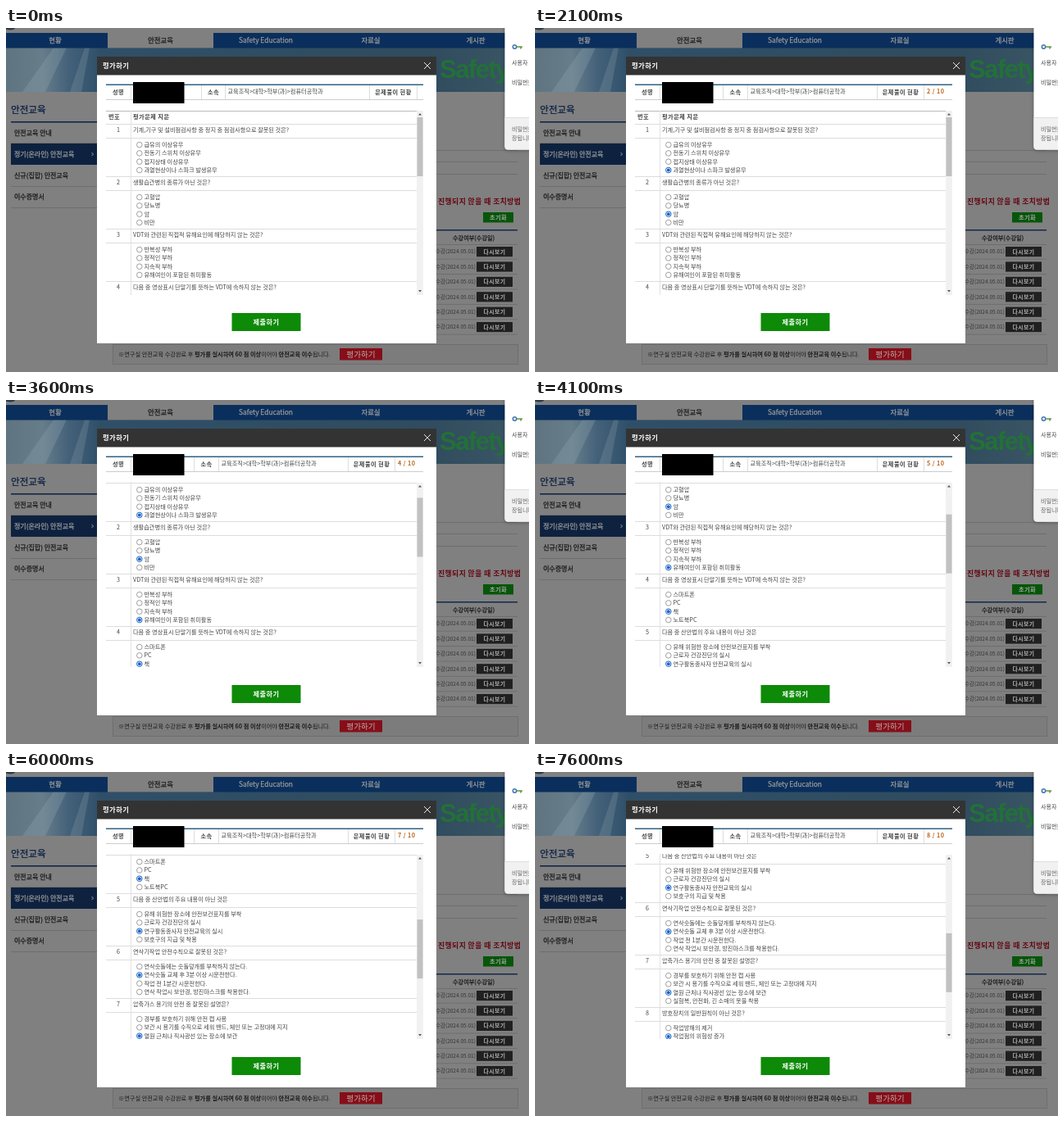
An HTML page for the animation above (8000 ms loop, 638 by 420 pixels).

```html
<!DOCTYPE html>
<html>
<head>
<meta charset="utf-8">
<style>
html, body { margin: 0; width: 100%; height: 100%; overflow: hidden; background: #808080; }
svg { display: block; width: 638px; height: 420px; }
text { font: 7.2px "Noto Sans CJK KR", "Noto Sans CJK", "Noto Sans CJK JP", sans-serif; fill: #444; white-space: pre; }
.b { font-weight: 700; letter-spacing: .45px; }
.banner { font: 700 31px "Liberation Sans", sans-serif; letter-spacing: -1.5px; fill: #237038; }
</style>
</head>
<body>
<svg id="stage" viewBox="0 0 638 420">
  <defs>
    <clipPath id="view"><rect x="122" y="100" width="379" height="226"/></clipPath>
    <linearGradient id="sky">
      <stop offset="0" stop-color="#5f7480"/><stop offset=".07" stop-color="#667d8a"/>
      <stop offset=".12" stop-color="#44617a"/><stop offset=".18" stop-color="#2f4f68"/>
      <stop offset=".82" stop-color="#304c5e"/><stop offset="1" stop-color="#3c5866"/>
    </linearGradient>
    <filter id="soft" x="-30%" y="-10%" width="160%" height="130%">
      <feDropShadow dx="0" dy="1" stdDeviation="2" flood-opacity=".35"/>
    </filter>
  </defs>
  <g id="page"></g>
  <g id="dialog"></g>
  <g id="fields"></g>
  <g clip-path="url(#view)"><g id="list"></g></g>
  <g id="bar"></g>
  <g id="popup"></g>
</svg>
<script>
const $ = id => document.getElementById(id);
const rect = (x, y, w, h, fill, more = '') =>
  `<rect x="${x}" y="${y}" width="${w}" height="${h}" fill="${fill}" ${more}/>`;
const path = (d, stroke, width = 1, fill = 'none') =>
  `<path d="${d}" stroke="${stroke}" stroke-width="${width}" fill="${fill}"/>`;
// y is the middle of the line of text; heavy thickens the strokes a little
const text = (x, y, str, { size = 7.2, fill = '#444', bold = 0, mid = 0, heavy = 0 } = {}) =>
  `<text x="${x}" y="${y + size * .36}" ${bold ? 'class="b"' : ''} ${mid ? 'text-anchor="middle"' : ''}
    ${heavy ? `stroke="${fill}" stroke-width=".25"` : ''} style="font-size:${size}px;fill:${fill}">${str}</text>`;
const button = (x, y, w, h, fill, label, size, color = '#fff') =>
  rect(x, y, w, h, fill) + text(x + w / 2, y + h / 2, label, { size, fill: color, bold: 1, mid: 1 });

const QUESTIONS = [
  ['기계,기구 및 설비점검사항 중 정지 중 점검사항으로 잘못된 것은?', 3,
    '급유의 이상유무', '전동기 스위치 이상유무', '접지상태 이상유무', '과열현상이나 스파크 발생유무'],
  ['생활습관병의 종류가 아닌 것은?', 2, '고혈압', '당뇨병', '암', '비만'],
  ['VDT와 관련된 직접적 유해요인에 해당하지 않는 것은?', 3,
    '반복성 부하', '정적인 부하', '지속적 부하', '유해여인이 포함된 취미활동'],
  ['다음 중 영상표시 단말기를 뜻하는 VDT에 속하지 않는 것은?', 2, '스마트폰', 'PC', '책', '노트북PC'],
  ['다음 중 산안법의 주요 내용이 아닌 것은', 2, '유해 위험한 장소에 안전보건표지를 부착',
    '근로자 건강진단의 실시', '연구활동종사자 안전교육의 실시', '보호구의 지급 및 착용'],
  ['연삭기작업 안전수칙으로 잘못된 것은?', 1, '연삭숫돌에는 숫돌덮개를 부착하지 않는다.',
    '연삭숫돌 교체 후 3분 이상 시운전한다.', '작업 전 1분간 시운전한다.', '연삭 작업시 보안경, 방진마스크를 착용한다.'],
  ['압축가스 용기의 안전 중 잘못된 설명은?', 2, '경부를 보호하기 위해 안전 캡 사용',
    '보관 시 용기를 수직으로 세워 밴드, 체인 또는 고정대에 지지', '열원 근처나 직사광선 있는 장소에 보관',
    '실험복, 안전화, 긴 소매의 옷을 착용'],
  ['방호장치의 일반원칙이 아닌 것은?', 1, '작업방해의 제거', '작업점의 위험성 증가']
];
const CLICKS = [500, 1500, 2400, 3200, 4100, 5000, 5900, 7200];
const LOOP = 8000, ROW = 64;
const optionY = (q, i) => 142.4 + q * ROW + i * 10.3;
// each answer is scrolled just into view before it is picked
const scrollFor = n => n ? Math.max(0, Math.round(optionY(n - 1, QUESTIONS[n - 1][1]) - 322.3)) : 0;

function drawPage() {
  const navy = '#0a2144', dark = '#1a1a1a', line = '#6e6e6e', pale = '#9a9a9a';
  let s = '<ellipse cx="5" cy="0" rx="6" ry="2.5" fill="#2b3c4d"/>';
  s += rect(0, 24, 638, 54, 'url(#sky)');
  s += path('M20 78L58 24H74L48 78Z', 'none', 0, '#8fa2ac50');
  s += path('M78 78L96 24H102L92 78Z', 'none', 0, '#8fa2ac40');
  s += '<text class="banner" x="529" y="60.500">Safety</text>';
  s += rect(0, 6, 638, 18.5, '#0a2f5c') + rect(124, 6, 129, 18.5, '#808080');
  [[60, '현황'], [188.5, '안전교육'], [317, 'Safety Education'], [445, '자료실'], [573, '게시판']].forEach(([x, label], i) =>
    s += text(x, 14.5, label, { size: 8.4, mid: 1, heavy: 1, fill: i == 1 ? dark : pale }));

  s += text(6, 100, '안전교육', { size: 11.6, fill: navy, heavy: 1 });
  s += rect(6, 114, 105, 1.5, navy) + rect(6, 141, 105, 26, '#0e2240');
  s += path('M6 140.5H111M6 193.5H111M6 219.5H111', line);
  ['안전교육 안내', '정기(온라인) 안전교육', '신규(집합) 안전교육', '이수증명서'].forEach((label, i) =>
    s += text(10, 128.5 + i * 25.8, label, { size: 8, heavy: 1, fill: i == 1 ? pale : dark }));
  s += path('M104.500 152L106.500 154L104.500 156', pale);

  s += path('M525 149.500H624M525 163.500H624M525 178.500H624', line);
  s += text(527, 212, '진행되지 않을 때 조치방법', { size: 8.8, fill: '#650713', bold: 1 });
  s += button(582, 225, 37, 12.5, '#07560a', '초기화', 7.2, '#a8a8a8');
  s += rect(525, 246, 99, 1.5, '#12294a');
  s += text(570.5, 256, '수강여부(수강일)', { fill: dark, mid: 1, heavy: 1 });
  s += path('M525 264.500H624', line);
  for (let i = 0; i < 6; i++) {
    const y = 273 + i * 18.4;
    s += text(524, y, '수강(2024.05.01)', { size: 6.5, fill: '#333' });
    s += button(574, y - 6, 44, 12.2, '#202020', '다시보기', 6.8, '#b0b0b0');
    s += path(`M525 ${y + 9.2}H624`, line);
  }
  s += rect(130.5, 386.5, 494, 24, '#7c7c7c', `stroke="${line}"`);
  s += `<text x="137" y="400.5" style="fill:${dark}">※연구실 안전교육 수강완료 후 <tspan font-weight="700">평가를 실시하여 60 점 이상</tspan>이어야 <tspan font-weight="700">안전교육 이수</tspan>됩니다.</text>`;
  s += rect(407, 391, 52, 14.5, '#860e18') + text(433, 398.2, '평가하기', { size: 9.6, mid: 1, fill: '#b8b0b0' });
  $('page').innerHTML = s;
}

function drawDialog() {
  let s = rect(111, 35, 414, 350, '#fff') + rect(111, 35, 414, 22.5, '#333');
  s += text(118, 46.3, '평가하기', { size: 8.3, fill: '#fff', bold: 1 });
  s += path('M510 42L518 50M518 42L510 50', '#fff', .9);
  s += rect(275.5, 348, 84, 22, '#0d8a08');
  s += text(317.5, 359.5, '제출하기', { size: 8.2, fill: '#fff', bold: 1, mid: 1 });
  $('dialog').innerHTML = s;
}

function drawList(n) {
  let s = path('M122 101.500H501', '#bbb');
  s += text(132, 108.500, '번호', { bold: 1, mid: 1 }) + text(155, 108.500, '평가문제 지문', { bold: 1 });
  s += path(`M152.500 101V${117 + QUESTIONS.length * ROW}`, '#e2e2e2');
  QUESTIONS.forEach(([title, answer, ...options], q) => {
    const y = 117.5 + q * ROW;
    s += path(`M122 ${y}H501M122 ${y + 17}H501`, '#ddd');
    s += text(137, y + 7.4, q + 1, { mid: 1 }) + text(155, y + 7.4, title);
    options.forEach((label, i) => {
      const oy = optionY(q, i), on = q < n && i == answer;
      s += `<circle cx="162.800" cy="${oy + .2}" r="3.300" fill="#fff" stroke="${on ? '#1763c6' : '#777'}" stroke-width="${on ? 1 : .7}"/>`;
      if (on) s += `<circle cx="162.800" cy="${oy + .2}" r="2" fill="#1763c6"/>`;
      s += text(168.5, oy, label);
    });
  });
  $('list').innerHTML = s;
  $('list').setAttribute('transform', `translate(0 ${-scrollFor(n)})`);
}

function drawFields(n) {
  // the columns close up once the counter has a value
  const [a, b, c, d] = n ? [229.5, 259.5, 417.5, 474.5] : [238.5, 267.5, 443.5, 501.5];
  let s = rect(122, 68.5, 387, 1.5, '#2f6284') + path('M122 87.500H509', '#ccc');
  s += path([152.5, a, b, c, d].map(x => `M${x} 70V87`).join(''), '#ddd');
  s += text(137, 78, '성명', { bold: 1, mid: 1 }) + rect(155, 66, 62.500, 26, '#000');
  s += text((a + b) / 2, 78, '소속', { bold: 1, mid: 1 });
  s += text(b + 3, 77.3, '교육조직&gt;대학&gt;학부(과)&gt;컴퓨터공학과');
  s += text((c + d) / 2, 78, '문제풀이 현황', { bold: 1, mid: 1 });
  if (n) s += text(478, 77.3, n + ' / 10', { bold: 1, fill: '#b9651b' });
  $('fields').innerHTML = s;
}

function drawBar(n) {
  $('bar').innerHTML = rect(501, 101, 8, 225, '#f1f1f1') +
    rect(501.5, 109 + scrollFor(n) * .316, 7, 72, '#c1c1c1') +
    path('M503 106.500L505 104L507 106.500Z', 'none', 0, '#555') +
    path('M503 320L505 322.500L507 320Z', 'none', 0, '#555');
}

function drawPopup() {
  let s = rect(608.5, -10, 60, 158.5, '#fff', 'rx="4" filter="url(#soft)"');
  s += path('M608.500 110H638V148.500H612.500Q608.500 148.500 608.500 144.500Z', 'none', 0, '#f1f1f1');
  s += path('M608.500 109.500H638', '#ddd');
  s += '<circle cx="620.500" cy="23" r="2.200" fill="none" stroke="#3f76b5" stroke-width="1.500"/>';
  s += path('M623 23H630M628 23V25.500', '#5d9a3c', 1.6);
  s += text(617, 42, '사용자 이름', { size: 7 }) + text(617, 66, '비밀번호', { size: 7 });
  s += text(617, 123, '비밀번호', { size: 7, fill: '#666' }) + text(617, 134, '장됩니다.', { size: 7, fill: '#666' });
  $('popup').innerHTML = s;
}

drawPage();
drawDialog();
drawPopup();
let shown = -1;
function frame(now) {
  const n = CLICKS.filter(t => t <= now % LOOP).length;
  if (n != shown) {
    shown = n;
    [drawFields, drawList, drawBar].forEach(draw => draw(n));
  }
  requestAnimationFrame(frame);
}
frame(0);
</script>
</body>
</html>
```
